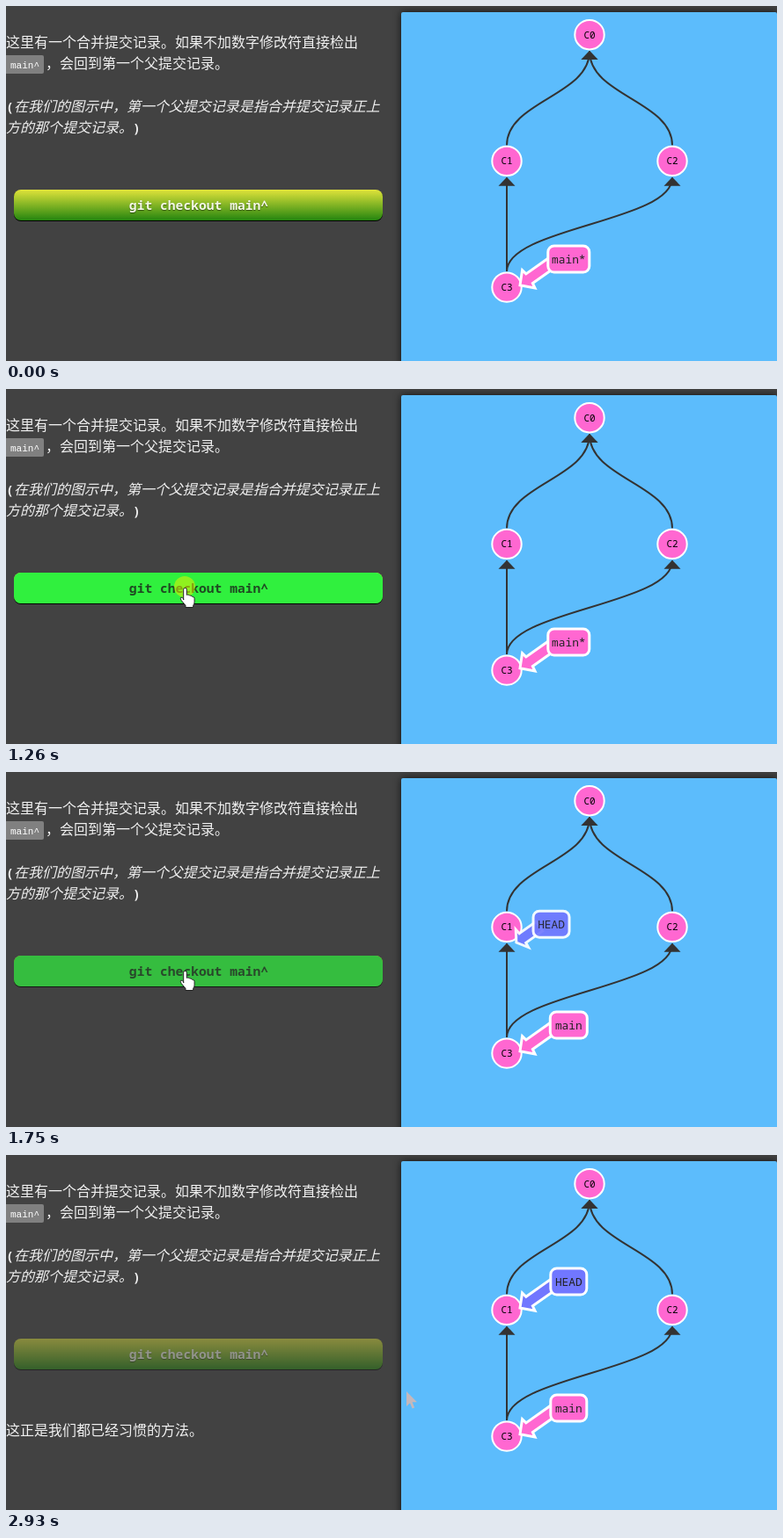
These frames come from a looping animation (876 px wide and 404 px high, 3900 ms). An HTML page:

```html
<!DOCTYPE html>
<html lang="zh-CN">
<head>
<meta charset="utf-8">
<title>git checkout main^</title>
<style>
html, body { margin: 0; width: 100%; height: 100%; overflow: hidden; background: #424242; }
svg { display: block; width: 876px; height: 404px; }
text { white-space: pre; }
.cjk { font: 300 16px "Noto Sans CJK SC", "Noto Sans CJK", sans-serif; fill: #f0f0f0; }
.mono { font-family: "Noto Sans Mono", "DejaVu Sans Mono", monospace; }
.paren { font-size: 14.67px; font-weight: bold; fill: #f0f0f0; }
.code { font: 11px "Liberation Mono", monospace; fill: #fff; }
.cmd { font-size: 14.67px; font-weight: bold; text-anchor: middle; }
.node { font-size: 11px; text-anchor: middle; fill: #000; }
.tag { font-size: 12.83px; text-anchor: middle; fill: #222; }
.panel { filter: drop-shadow(0 0 4px rgba(0,0,0,.75)); }
.lit { text-shadow: 0 1px 1px rgba(0,0,0,.5); }
</style>
</head>
<body>
<svg id="stage" viewBox="0 0 876 404" xmlns="http://www.w3.org/2000/svg">
  <defs>
    <linearGradient id="lime" x1="0" y1="0" x2="0" y2="1">
      <stop offset="0" stop-color="#e0e33a"/>
      <stop offset="1" stop-color="#24850f"/>
    </linearGradient>
  </defs>
  <rect width="876" height="404" fill="#424242"/>

  <text class="cjk" x="0" y="47">这里有一个合并提交记录。如果不加数字修改符直接检出</text>
  <rect x="-3" y="56" width="46" height="21" rx="2" fill="#808080"/>
  <text class="code" x="5" y="71">main^</text>
  <text class="cjk" x="45" y="71">，会回到第一个父提交记录。</text>
  <text class="mono paren" x="0" y="120">(</text>
  <text class="cjk" transform="translate(9 120) skewX(-14)">在我们的图示中，第一个父提交记录是指合并提交记录正上</text>
  <text class="cjk" transform="translate(0 144) skewX(-14)">方的那个提交记录。</text>
  <text class="mono paren" x="144" y="144">)</text>
  <text class="cjk" id="note" x="0" y="319">这正是我们都已经习惯的方法。</text>

  <g id="button">
    <rect x="9" y="210" width="419" height="35" rx="8" fill="#000"/>
    <rect x="9" y="209" width="419" height="35" rx="8" fill="url(#lime)"/>
    <text class="mono cmd lit" x="219" y="232" fill="#f4f8e4">git checkout main^</text>
    <g id="hover">
      <rect x="9" y="209" width="419" height="35" rx="8" fill="#30f03e"/>
      <text class="mono cmd" x="219" y="232" fill="#1f4a22">git checkout main^</text>
    </g>
  </g>

  <rect class="panel" x="449" y="7" width="427" height="420" rx="2" fill="#5cbcfc"/>
  <g id="graph"></g>
  <g id="tags"></g>

  <circle id="click" cx="203" cy="225" r="12" fill="#f0f000" fill-opacity=".5"/>
  <path id="trail" d="M0 0V17L4 13.3 6.6 19.5 9.2 18.4 6.6 12.2H12Z" transform="translate(455 269)" fill="#c4b8bc"/>
  <path id="arrow" d="M.5.5V17L4.2 13.4 6.8 19.3 9.2 18.2 6.7 12.4H12Z" fill="#fff" stroke="#222"/>
  <path id="hand" d="M3.7 14V2.2a1.8 1.8 0 0 1 3.6 0V8.3l1.2-.2q1.7-.2 2.1 1l1 0q1.6 0 1.9 1.2l.8 0q1.8.2 1.8 2.2V16.5q0 2-1.4 3.8V22.5H6V20.3L1.2 14.6Q-.4 12.2.8 11.2 2.2 10.6 3.7 13Z" fill="#fff" stroke="#222"/>
</svg>
<script>
const LOOP = 3900;
const TICKS = [0, 60, 130, 360, 430, 490, 550, 610, 670, 730, 790, 860, 910, 980, 1260,
  1400, 1460, 1510, 1560, 1630, 1690, 1750, 1800, 1860, 1920, 1990,
  2150, 2220, 2270, 2340, 2400, 2460, 2530, 2590, 2650, 2700, 2780, 2850, 2930];
// Pointer path: time, x, y
const POINTER = [[60, 460, 366], [130, 413, 358], [360, 405, 354], [790, 197, 234], [860, 197, 233],
  [980, 198, 226], [1860, 198, 226], [1990, 235, 234], [2150, 240, 234], [2220, 277, 235],
  [2270, 318, 243], [2400, 455, 269], [2590, 686, 354]];
const PINK = '#ff67d1', INK = '#333';

const $ = id => document.getElementById(id);
const clamp = x => Math.max(0, Math.min(1, x));
const span = (t, a, b) => clamp((t - a) / (b - a));
const lerp = (a, b, p) => a + (b - a) * p;
const cubicInOut = x => x < .5 ? 4 * x ** 3 : 1 - 4 * (1 - x) ** 3;

function add(parent, name, attrs, text) {
  const el = document.createElementNS('http://www.w3.org/2000/svg', name);
  set(el, attrs);
  if (text) el.textContent = text;
  return parent.appendChild(el);
}
function set(el, attrs) {
  for (const k in attrs) el.setAttribute(k, attrs[k]);
}
function show(id, on) {
  $(id).setAttribute('visibility', on ? 'visible' : 'hidden');
}

const nodes = { C0: [663, 32.7], C1: [569, 176.4], C2: [757, 176.4], C3: [569, 320.1] };

function edge(from, to) {
  const [x1, y1] = nodes[from], [x2, y2] = nodes[to];
  const a = y1 - 18, tip = y2 + 19, bend = 50;
  add($('graph'), 'path', {
    d: `M${x1} ${a}C${x1} ${a - bend} ${x2} ${tip + bend} ${x2} ${tip}`,
    fill: 'none', stroke: INK, 'stroke-width': 2
  });
  add($('graph'), 'path', { d: `M${x2} ${tip - .7}l9.5 10h-19Z`, fill: INK });
}
[['C1', 'C0'], ['C2', 'C0'], ['C3', 'C1'], ['C3', 'C2']].forEach(e => edge(...e));
for (const id in nodes) {
  const [cx, cy] = nodes[id];
  add($('graph'), 'circle', { cx, cy, r: 16.7, fill: PINK, stroke: '#fff', 'stroke-width': 2 });
  add($('graph'), 'text', { class: 'mono node', x: cx, y: cy + 4 }, id);
}

function makeTag(fill) {
  const g = add($('tags'), 'g', {});
  const look = { fill, stroke: '#fff', 'stroke-width': 3 };
  return {
    g,
    arrow: add(g, 'path', look),
    box: add(g, 'rect', { ...look, height: 30, rx: 7 }),
    text: add(g, 'text', { class: 'mono tag' })
  };
}
const mainTag = makeTag(PINK), headTag = makeTag('#7177ff');

// reach: 1 points down-left from the box, -1 points up-right
function placeTag(tag, { label, x, y, w, tip, reach, alpha }) {
  const c = .816, s = .577;
  const outline = [[0, 0], [12, -12.5], [13, -6.5], [48, -6.5], [48, 6.5], [13, 6.5], [12, 12.5]];
  const pts = outline.map(([u, n]) => {
    u *= reach;
    return (tip[0] + u * c + n * s).toFixed(2) + ' ' + (tip[1] - u * s + n * c).toFixed(2);
  });
  set(tag.arrow, { d: 'M' + pts.join('L') + 'Z', opacity: alpha });
  set(tag.box, { x: x - w / 2, y: y - 15, width: w, opacity: alpha });
  set(tag.text, { x, y: y + 4.5, opacity: alpha });
  tag.text.textContent = label;
}

function pointerAt(t) {
  let i = POINTER.findIndex(k => k[0] > t);
  if (i < 1) i = POINTER.length - 1;
  const [t0, x0, y0] = POINTER[i - 1], [t1, x1, y1] = POINTER[i];
  const p = span(t, t0, t1);
  return [lerp(x0, x1, p), lerp(y0, y1, p)];
}

function draw(time) {
  const t = TICKS.filter(k => k <= time).pop();

  const dim = 1 - Math.pow(1 - span(t, 1400, 1920), 1.5);
  const leave = span(t, 2270, 2930);
  const hover = t < 1400 ? span(t, 550, 790) : 1 - leave;
  $('button').setAttribute('opacity', lerp(lerp(1, .64, dim), .45, leave));
  $('hover').setAttribute('opacity', hover);
  $('note').setAttribute('opacity', span(t, 2150, 2650));

  const p = cubicInOut(span(t, 1430, 1920));
  placeTag(mainTag, {
    label: t < 1430 ? 'main*' : 'main', x: 639.3, y: 288, w: lerp(47, 41, p),
    tip: [584, 317.7], reach: 1, alpha: 1
  });
  placeTag(headTag, {
    label: 'HEAD', x: lerp(521, 639.3, p), y: lerp(319, 144, p), w: 41,
    tip: [lerp(559.2, 584, p), lerp(294, 174, p)], reach: lerp(-1, 1, p), alpha: Math.sqrt(p)
  });

  const [px, py] = pointerAt(t);
  const present = t >= 60 && t < 2650;
  const over = px < 426 && py > 206 && py < 244;
  show('hand', present && over);
  show('arrow', present && !over);
  show('trail', t >= 2400);
  show('click', t >= 1260 && t < 1400);
  for (const id of ['hand', 'arrow']) $(id).setAttribute('transform', `translate(${px} ${py})`);
}

const start = performance.now();
function tick() {
  draw((performance.now() - start) % LOOP);
  requestAnimationFrame(tick);
}
draw(0);
requestAnimationFrame(tick);
</script>
</body>
</html>
```
